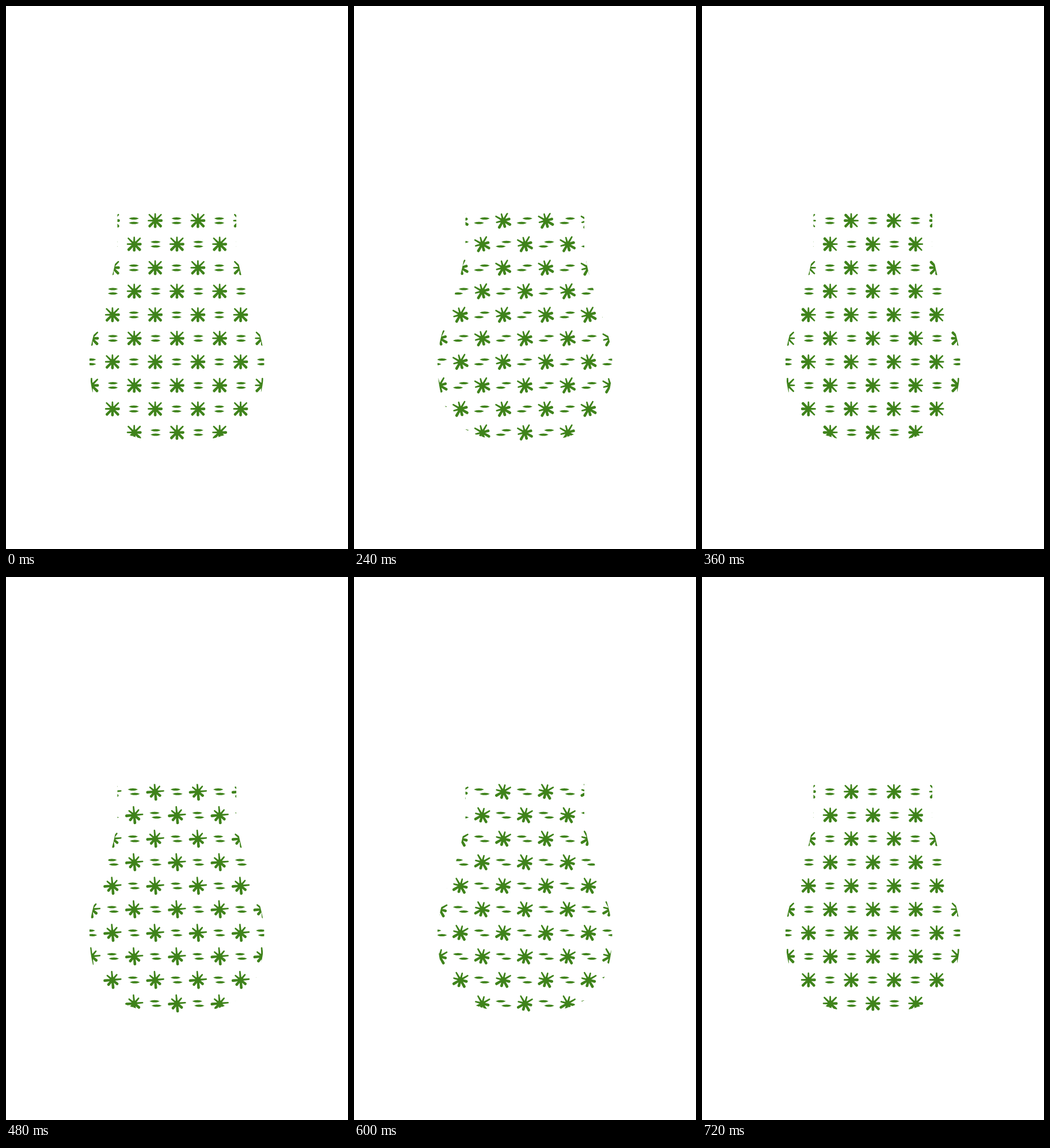
Recreate the animation shown at these times as an HTML page with a canvas. Size 594 px wide and 943 px high, loop 0.75 s.

```html
<!DOCTYPE html>
<html>
<head>
<meta charset="utf-8">
<style>
  html, body { margin: 0; width: 100%; height: 100%; overflow: hidden; background: #fff; }
  canvas { display: block; }
</style>
</head>
<body>
<canvas id="stage" width="594" height="943"></canvas>
<script>
const ctx = document.getElementById('stage').getContext('2d');
const LOOP = 750, STEP = 30, HALF = 12;
const COLUMN = 37.1, ROW = 40.87;

const vase = new Path2D(`M193.5 359.5 V421 Q190 455 175 500
  C160 545 145 585 145 617 C145 715 185 757 297 757
  C409 757 448.5 715 448.5 617 C448.5 585 433.5 545 418.5 500
  Q403.5 455 400 421 V359.5Z`);
const dash = new Path2D('M-8.8 0 L-5 -1.5 Q0 -2.5 5 -1.5 L8.8 0 L5 1.5 Q0 2.5 -5 1.5Z');
const star = makeStar();

// Four brush strokes, long and short in turn, each thick at one end.
function makeStar() {
  const path = new Path2D();
  path.arc(0, 0, 5, 0, 2 * Math.PI);
  for (let i = 0; i < 4; i++) {
    const thick = 2.4, thin = 1.3, length = i % 2 ? 15.8 : 13;
    const stroke = new Path2D();
    stroke.arc(length - thick, 0, thick, -Math.PI / 2, Math.PI / 2);
    stroke.arc(thin - length, 0, thin, Math.PI / 2, Math.PI * 1.5);
    stroke.closePath();
    path.addPath(stroke, new DOMMatrix().rotate(i * 45));
  }
  return path;
}

function fillAt(path, x, y, degrees = 0) {
  ctx.save();
  ctx.translate(x, y);
  ctx.rotate(degrees * Math.PI / 180);
  ctx.fill(path);
  ctx.restore();
}

function draw(now) {
  // The second half of the loop swings the other way.
  const step = Math.floor((now % LOOP) / STEP) || 2 * HALF;
  const side = step < HALF ? 1 : -1;
  const u = (side > 0 ? step : step - HALF) / HALF;
  const angle = -side * 90 * (1 - u) / (1 + 1.5 * u);
  const shift = side * 41 * u ** 2.5 * (1 - u);

  ctx.clearRect(0, 0, 594, 943);
  ctx.save();
  ctx.clip(vase);
  ctx.fillStyle = '#3f831b';
  for (let row = 0; row < 10; row++) {
    for (let col = 0; col < 9; col++) {
      const x = 296.2 + (col - 4) * COLUMN + (row % 2) * 0.7;
      const y = 372.7 + row * ROW;
      if ((row + col) % 2) {
        fillAt(star, x, y, angle);
      } else {
        fillAt(dash, x + shift, y - 3.8);
        fillAt(dash, x - shift, y + 4);
      }
    }
  }
  ctx.restore();
}

const start = performance.now();
function tick() {
  draw(performance.now() - start);
  requestAnimationFrame(tick);
}
tick();
</script>
</body>
</html>
```
